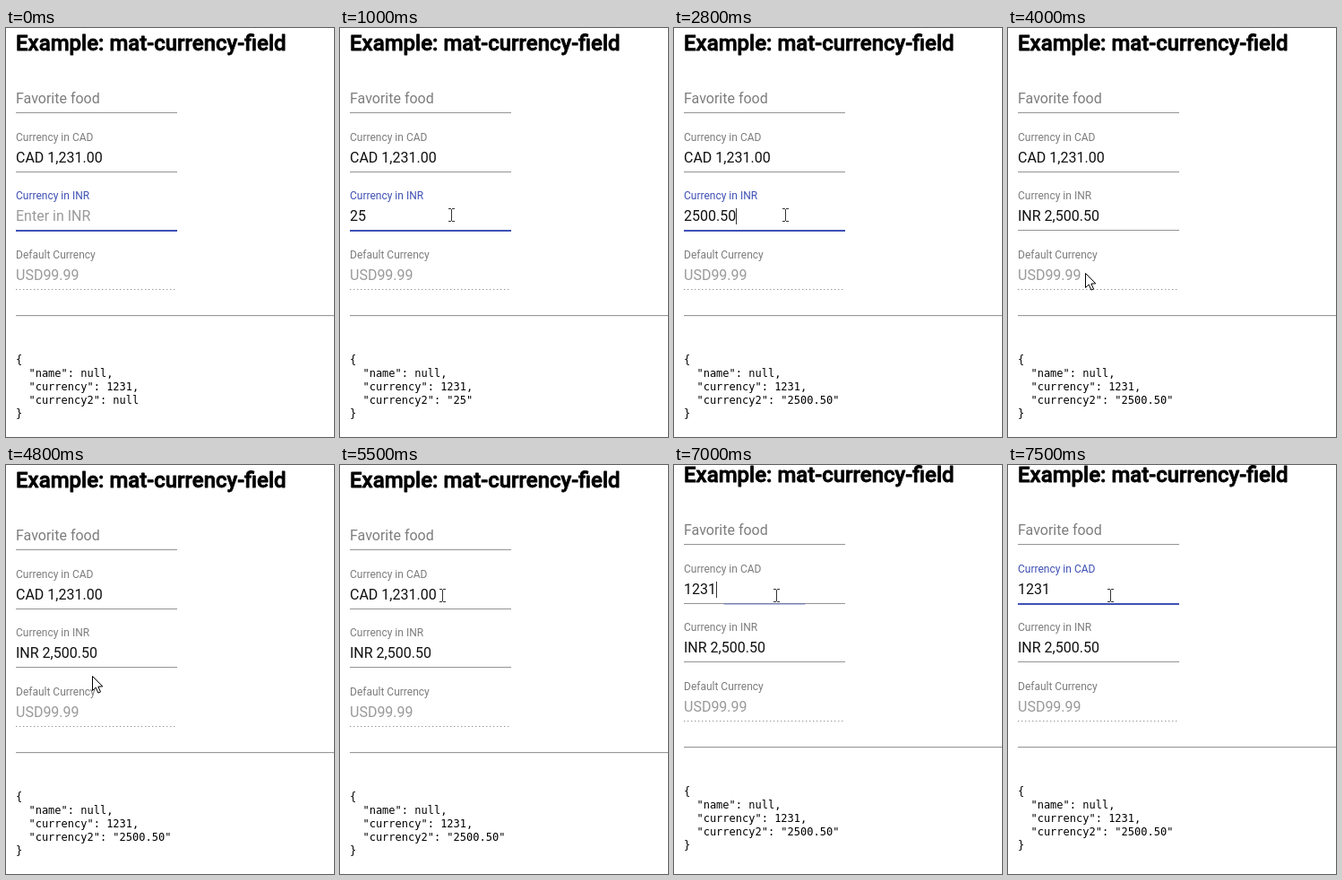
Write an HTML page with a canvas that moves like this. It is 366 px wide and 456 px high and loops after 8 s.

```html
<!DOCTYPE html>
<html lang="en">
<head>
<meta charset="utf-8">
<title>Currency field</title>
<style>
  html, body { margin: 0; width: 100%; height: 100%; overflow: hidden; background: #fff; }
  canvas { display: block; }
</style>
</head>
<body>
<canvas id="stage" width="366" height="456"></canvas>
<script>
const ctx = document.getElementById('stage').getContext('2d');
const LOOP = 8000;
const LEFT = 11, WIDTH = 180;
const BODY = '16px Roboto, sans-serif';
const SMALL = '12px Roboto, sans-serif';
const MONO = '12px "DejaVu Sans Mono", monospace';
const GREY = [125, 125, 125], BLUE = [63, 81, 181], RED = [236, 66, 54];
const INK = '#111', HINT = 'rgba(0,0,0,.4)', RULE = '#949494';

const BLUR = 3500, FOCUS = 7000;
// [time, typed text]; every entry also restarts the caret blink
const KEYS = [[200, '2'], [500, '25'], [1200, '250'], [1300, '2500'],
  [1700, '2500.'], [1900, '2500.'], [2400, '2500.5'], [2600, '2500.50']];
// [time, x, y] of the pointer
const PATH = [[500, 124, 208], [3000, 124, 208], [3400, 108, 242], [3800, 88, 274],
  [4000, 86, 273], [4300, 86, 273], [4500, 87, 277], [5100, 104, 194], [5500, 114, 145]];

const ramp = (t, from, to) => Math.min(1, Math.max(0, (t - from) / (to - from)));
const ease = p => 1 - (1 - p) ** 3;
const mix = (a, b, p) => a.map((v, i) => v + (b[i] - v) * p);
const rgb = c => `rgb(${c.map(Math.round).join()})`;

function text(str, x, y, font, color) {
  ctx.font = font;
  ctx.fillStyle = color;
  ctx.fillText(str, x, y);
}

function rect(x, y, w, h, color) {
  ctx.fillStyle = color;
  ctx.fillRect(x, y, w, h);
}

function field(y, { label, labelColor = GREY, value, color = INK, dotted }) {
  if (label) text(label, LEFT, y - 34, SMALL, rgb(labelColor));
  text(value, LEFT, y - 10, BODY, color);
  if (!dotted) return rect(LEFT, y, WIDTH, 1, RULE);
  for (let x = 0; x < WIDTH; x += 4) rect(LEFT + x, y, 1.33, 1, RULE);
}

function ripple(y, color, scale, alpha) {
  ctx.globalAlpha = alpha;
  rect(LEFT + WIDTH * (1 - scale) / 2, y, WIDTH * scale, 2, rgb(color));
  ctx.globalAlpha = 1;
}

function caret(str, y, since) {
  if (since % 1000 >= 500) return;
  ctx.font = BODY;
  rect(Math.round(LEFT + ctx.measureText(str).width), y - 24, 1, 18, '#333');
}

function title() {
  const str = 'Example: mat-currency-field';
  text(str, LEFT, 25, '500 24px Roboto, sans-serif', '#000');
  ctx.strokeStyle = '#000';
  ctx.lineWidth = 0.8;
  ctx.lineJoin = 'round';
  ctx.strokeText(str, LEFT, 25);
}

function cadField(t) {
  const focused = t >= FOCUS;
  const p = ease(ramp(t, FOCUS, FOCUS + 300));
  field(160, {
    label: 'Currency in CAD',
    labelColor: mix(GREY, BLUE, p),
    value: focused ? '1231' : 'CAD 1,231.00'
  });
  if (!focused) return;
  ripple(160, BLUE, 0.5 + p / 2, ramp(t, FOCUS - 50, FOCUS + 100));
  caret('1231', 160, t - FOCUS);
}

function inrField(t, key) {
  const focused = t < BLUR;
  const typed = key ? key[1] : '';
  const fixed = ease(ramp(t, 2400, 2700));
  const labelError = ramp(t, 1680, 1810) * (1 - fixed);
  const lineError = ramp(t, 1700, 2000) ** 1.3 * (1 - fixed);
  const out = ease(ramp(t, BLUR, BLUR + 300));
  field(225, {
    label: 'Currency in INR',
    labelColor: mix(mix(BLUE, RED, labelError), GREY, out),
    value: focused ? typed || 'Enter in INR' : 'INR 2,500.50',
    color: typed ? INK : HINT
  });
  if (out < 1) ripple(225, mix(BLUE, RED, lineError), 1, 1 - out);
  if (focused && key) caret(typed, 225, t - key[0]);
}

function json(typed) {
  const lines = ['{', '  "name": null,', '  "currency": 1231,',
    `  "currency2": ${typed ? `"${typed}"` : 'null'}`, '}'];
  lines.forEach((line, i) => text(line, LEFT, Math.round(374 + i * 15.1), MONO, '#000'));
}

function pointerAt(t) {
  const i = PATH.findIndex(p => p[0] > t);
  if (i < 0) return PATH[PATH.length - 1].slice(1);
  const [t0, ...a] = PATH[i - 1], [t1, ...b] = PATH[i];
  return mix(a, b, ramp(t, t0, t1)).map(Math.round);
}

function beam(x, y) {
  rect(x, y - 6, 1, 13, '#333');
  for (const edge of [y - 7, y + 7]) {
    rect(x - 3, edge, 3, 1, '#333');
    rect(x + 1, edge, 3, 1, '#333');
  }
}

function arrow(x, y) {
  ctx.save();
  ctx.translate(x + 0.5, y + 0.5);
  ctx.beginPath();
  ctx.moveTo(0, 0);
  for (const [px, py] of [[0, 16], [3.7, 12.6], [6.4, 18.6], [9, 17.5], [6.4, 11.6], [11.3, 11.4]])
    ctx.lineTo(px, py);
  ctx.closePath();
  ctx.fillStyle = '#fff';
  ctx.fill();
  ctx.strokeStyle = '#000';
  ctx.lineWidth = 1;
  ctx.lineJoin = 'miter';
  ctx.stroke();
  ctx.restore();
}

function pointer(t) {
  if (t < PATH[0][0]) return;
  const [x, y] = pointerAt(t);
  const overInput = [145, 210].some(mid => Math.abs(y - mid) < 11);
  (overInput ? beam : arrow)(x, y);
}

function draw(t) {
  const key = KEYS.filter(k => k[0] <= t).pop();
  const scroll = t < 6000 ? 0 : t < 6200 ? 5 : 6;
  rect(0, 0, 366, 456, '#fff');
  ctx.save();
  ctx.translate(0, -scroll);
  title();
  field(94, { value: 'Favorite food', color: rgb(GREY) });
  cadField(t);
  inrField(t, key);
  field(291, { label: 'Default Currency', value: 'USD99.99', color: HINT, dotted: true });
  rect(LEFT, 320, 355, 1, '#9a9a9a');
  rect(LEFT, 321, 355, 1, '#eee');
  json(key && key[1]);
  ctx.restore();
  pointer(t);
}

const start = performance.now();
function tick() {
  draw((performance.now() - start) % LOOP);
  requestAnimationFrame(tick);
}
tick();
</script>
</body>
</html>
```
